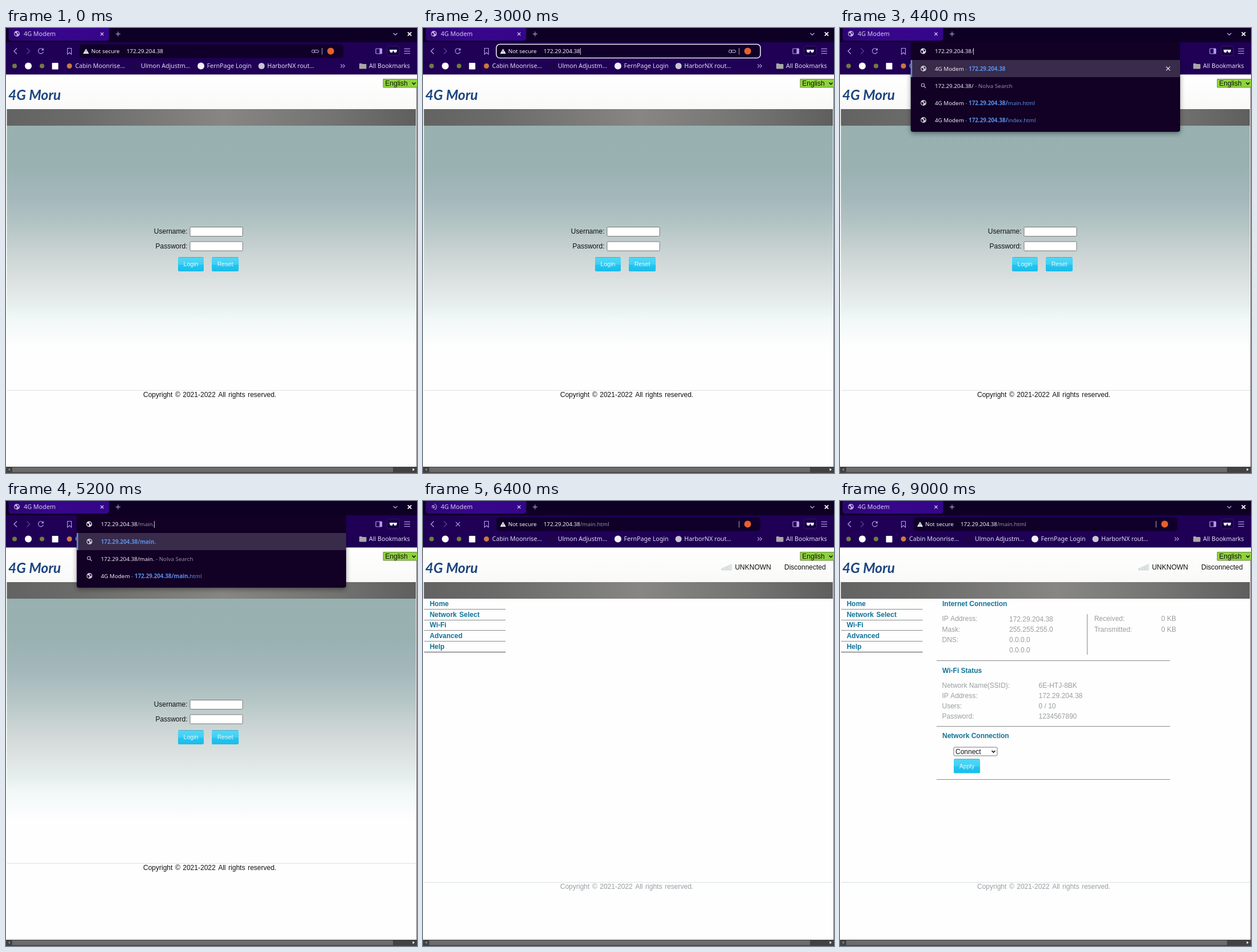
Animation of 719x779 px, one loop 9.2 s. Source, as an HTML page with a canvas:

```html
<!DOCTYPE html>
<html lang="en">
<head>
<meta charset="utf-8">
<title>Modem login</title>
<style>
html, body { margin: 0; width: 100%; height: 100%; overflow: hidden; background: #fefefe; }
canvas { display: block; }
</style>
</head>
<body>
<canvas id="stage" width="719" height="779"></canvas>
<script>
const ctx = document.getElementById('stage').getContext('2d');
const LOOP = 9200, STEP = 200;
const UI = '"Noto Sans", sans-serif';
const PAGE = '"Liberation Sans", Arial, sans-serif';
const HOST = '172.29.204.38', PATH = '/main.html';
const LILAC = '#b59be6', PALE = '#e4daf4', BLUE = '#5a8fe8', DIM = '#968ca3';
const PANEL = '#120025', PICKED = '#392b4a';

// Time at which the path has grown to each length
const KEYS = [[3800, 1], [4600, 2], [4800, 3], [5000, 5], [5200, 6], [5400, 7], [5600, 8], [5800, 10]];
const FOCUS = 2800, OPEN = 3800, ENTER = 6200, ARRIVE = 6400, DONE = 6800;

function text(s, x, y, color, size = 12, family = PAGE, style = '') {
  ctx.font = `${style} ${size}px ${family}`;
  ctx.fillStyle = color;
  ctx.fillText(s, x, y);
  return x + ctx.measureText(s).width;
}
const ui = (s, x, y, color, size = 9.8, style = '') => text(s, x, y, color, size, UI, style);

function rect(x, y, w, h, fill) {
  ctx.fillStyle = fill;
  ctx.fillRect(x, y, w, h);
}

function box(x, y, w, h, r, fill, stroke, width = 1) {
  ctx.beginPath();
  ctx.roundRect(x, y, w, h, r);
  if (fill) { ctx.fillStyle = fill; ctx.fill(); }
  if (stroke) { ctx.strokeStyle = stroke; ctx.lineWidth = width; ctx.stroke(); }
}

function dot(x, y, r, fill) {
  ctx.beginPath();
  ctx.arc(x, y, r, 0, 7);
  ctx.fillStyle = fill;
  ctx.fill();
}

function arc(x, y, r, from, to, color, width) {
  ctx.beginPath();
  ctx.arc(x, y, r, from, to);
  ctx.strokeStyle = color;
  ctx.lineWidth = width;
  ctx.stroke();
}

function path(points, color, width = 1.2, fill) {
  ctx.beginPath();
  points.forEach(([x, y], i) => i ? ctx.lineTo(x, y) : ctx.moveTo(x, y));
  if (fill) { ctx.closePath(); ctx.fillStyle = fill; ctx.fill(); }
  if (color) { ctx.strokeStyle = color; ctx.lineWidth = width; ctx.stroke(); }
}

function ramp(x0, y0, x1, y1, stops) {
  const g = ctx.createLinearGradient(x0, y0, x1, y1);
  stops.forEach(([at, c]) => g.addColorStop(at, c));
  return g;
}

function cross(x, y, r, color, width) {
  path([[x - r, y - r], [x + r, y + r]], color, width);
  path([[x + r, y - r], [x - r, y + r]], color, width);
}

function globe(x, y, r, color, land) {
  dot(x, y, r, color);
  path([[x - r * .8, y - r * .3], [x - r * .1, y - r * .1], [x, y + r * .3], [x - r * .3, y + r * .8], [x - r * .7, y + r * .3]], 0, 0, land);
  path([[x, y - r * .8], [x + r * .7, y - r * .4], [x + r * .6, y + r * .3], [x + r * .2, y - r * .2]], 0, 0, land);
}

function arrow(x, y, color) {
  path([[x - 3, y - 1.5], [x, y + 1.5], [x + 3, y - 1.5]], color, 1.6);
}

function tabs(t) {
  rect(0, 0, 719, 26, '#0e0025');
  box(4.5, -8, 176, 30.3, 5, ramp(5, 0, 180, 0, [[0, '#2b0570'], [.4, '#37068b'], [1, '#35058a']]));
  if (t < ENTER || t >= DONE) globe(19, 10, 5, '#c3b5dc', '#37068b');
  else if (t >= ARRIVE) {
    const a = (t - ARRIVE) / 160 - 1.4;
    arc(19, 10, 4.8, a, a + 2.8, '#a996cc', 1.2);
    globe(18, 10, 2.7, '#b9aad4', '#37068b');
  }
  ui('4G Modem', 31, 14, '#d8ccef', 10.75);
  cross(168, 10.5, 2.6, '#dcd0f2', 1.3);
  path([[192, 10.5], [200, 10.5]], LILAC);
  path([[196, 6.5], [196, 14.5]], LILAC);
  path([[677.5, 9], [681, 12.3], [684.5, 9]], LILAC, 1.4);
  cross(706, 10.5, 3.2, '#fff', 1.8);
}

function toolbar(t) {
  rect(0, 25, 719, 56.4, '#1f0055');
  path([[19, 35.5], [14, 40.5], [19, 45.5]], LILAC, 1.3);
  path([[36.5, 35.5], [41.5, 40.5], [36.5, 45.5]], '#5b4290', 1.3);
  if (t >= ENTER && t < DONE) cross(61, 40.5, 3.6, LILAC, 1.3);
  else {
    arc(61, 40.3, 4.5, .3, 5.5, LILAC, 1.2);
    path([[65.8, 35], [65.8, 39.3], [61.8, 39.3]], 0, 0, LILAC);
  }
  path([[107.5, 35.5], [114.5, 35.5], [114.5, 46], [111, 43], [107.5, 46], [107.5, 35]], LILAC, 1.1);

  const focus = t >= FOCUS && t < OPEN;
  box(128.3, 28.5, 462, 24, 6, '#100029', focus && '#eee8f8', 1.6);
  path([[140, 36.3], [145, 45], [135, 45]], 0, 0, '#fff');
  rect(139.5, 39.5, 1, 2.6, '#100029');
  rect(139.5, 43, 1, 1, '#100029');
  ui('Not secure', 149, 44, '#f4effb');
  const end = ui(HOST, 211, 44, '#f4effb');
  if (t >= ARRIVE) ui(PATH, end, 44, DIM);
  if (focus && t < 3400) rect(275, 35, 1, 12, '#c9c0d6');
  if (t < ENTER) {
    box(539.5, 38.7, 7.5, 4.2, 2, 0, '#c9b9e6');
    arc(537.5, 40.8, 2.6, 0, 7, '#c9b9e6', 1);
  }
  rightOfUrl();

  box(647, 36, 10.5, 9, 1, 0, LILAC, 1.2);
  rect(653.5, 36, 4, 9, LILAC);
  box(666.5, 31.5, 22, 17, 4, '#170046', '#341a68');
  rect(671, 38, 13, 1.6, '#fff');
  box(671.5, 38, 5.2, 5, [0, 0, 2.5, 2.5], '#fff');
  box(678.3, 38, 5.2, 5, [0, 0, 2.5, 2.5], '#fff');
  for (const y of [36.5, 40.5, 44.5]) path([[696.5, y], [707, y]], LILAC, 1.2);
}

function rightOfUrl() {
  rect(552.5, 35, 1, 11.5, '#b8adc9');
  dot(568, 40.5, 6, '#e5602f');
}

function bookmarks() {
  dot(15, 66.5, 4, '#6f7d3c');
  dot(39, 66.5, 6, '#fff');
  dot(63, 66.5, 4, '#6f7d3c');
  box(80.5, 61, 11, 11.5, 1, '#fff');
  dot(111, 66.5, 4.5, '#c9793d');
  dot(225, 66.5, 5, '#190940');
  dot(341, 66.5, 6, '#f3f0f8');
  dot(447, 66.5, 5.5, '#c9c4d2');
  const names = [['Cabin Moonrise…', 121], ['Ulmon Adjustm…', 236], ['FernPage Login', 351.5], ['HarborNX rout…', 457]];
  names.forEach(([s, x]) => ui(s, x, 70, PALE, 10.65));
  for (const x of [585.5, 589.5]) path([[x, 63.5], [x + 3, 66.5], [x, 69.5]], LILAC, 1.1);
  rect(605.5, 60, 1, 13, '#12003a');
  box(618, 62, 5, 4, 1, '#a7a7a7');
  box(618, 63, 12.5, 8.5, 1, '#a7a7a7');
  ui('All Bookmarks', 635, 70, PALE, 10.65);
}

function dropdown(t) {
  const typed = KEYS.reduce((n, [at, len]) => t >= at ? len : n, 0);
  const part = PATH.slice(0, typed), full = typed === PATH.length;
  const leaving = t >= ENTER;
  const url = HOST + part;
  // Each row: title, bold match, plain rest; 0 is the search row
  const page = (match, rest) => ['4G Modem', match, rest];
  const rows = typed === 1 ? [page(HOST, ''), 0, page(url, 'main.html'), page(url, 'index.html')]
    : full ? [page(url, ''), 0]
    : [['', url, ''], 0, page(url, PATH.slice(typed))];
  const bottom = 61.7 + 30 * rows.length;

  ctx.save();
  if (leaving) ctx.globalAlpha = .8;
  ctx.save();
  ctx.beginPath();
  ctx.rect(105, 56, 510, 200);
  ctx.clip();
  ctx.shadowColor = 'rgba(0,0,0,.4)';
  ctx.shadowBlur = 8;
  ctx.shadowOffsetY = 3;
  // One fill holds both the picked row and the panel, so fading stays even
  const cut = 30 / (bottom - 56);
  const fill = ramp(0, 56, 0, bottom, [[0, PICKED], [cut, PICKED], [cut, PANEL], [1, PANEL]]);
  box(123.7, 25, 471.3, bottom - 25, [0, 0, 4, 4], fill);
  ctx.restore();
  rect(123.7, 56, 2.5, 30, BLUE);
  rows.forEach((row, i) => {
    const y = 71 + 30 * i, bg = i ? PANEL : PICKED;
    if (!row) {
      arc(145, y - 1, 2.7, 0, 7, '#bdb3c9', 1.1);
      path([[147, y + 1], [150, y + 4]], '#bdb3c9', 1.3);
      ui(' - Nolva Search', ui(url, 166, y + 4, '#eee8f5'), y + 4, DIM);
      return;
    }
    globe(146, y, 5, '#d2cadb', bg);
    let x = 166;
    if (row[0]) x = ui(' - ', ui(row[0], x, y + 4, '#eee8f5'), y + 4, DIM);
    x = ui(row[1], x, y + 4, BLUE, 9.8, '600');
    ui(row[2], x, y + 4, BLUE);
    if (!i && row[0]) cross(574, y, 3.4, '#eee8f5', 1.3);
  });
  ctx.restore();

  rect(123.7, 25, 471.3, 31, PANEL);
  if (leaving) {
    dot(140, 40.5, 5, '#fff');
    rect(139.4, 40, 1.2, 3.5, PANEL);
    rect(139.4, 37.5, 1.2, 1.3, PANEL);
    ui(PATH, ui(HOST, 156, 44, '#f4effb'), 44, DIM);
    rightOfUrl();
  } else {
    globe(145.5, 40.5, 5, '#e6e0ee', PANEL);
    const end = ui(part, ui(HOST, 166, 44, '#f4effb'), 44, DIM);
    rect(Math.round(end - .8), 35, 1, 12, '#c9c0d6');
  }
}

function button(label, x, y, w, h) {
  box(x, y, w, h, 2, ramp(0, y, 0, y + h, [[0, '#50d8f5'], [.5, '#40d0f4'], [.56, '#24c4ef'], [1, '#19bdea']]));
  rect(x + 1, y, w - 2, 1, '#5ba6bd');
  ctx.textAlign = 'center';
  text(label, x + w / 2, y + 16, '#e4faff', 10.6);
  ctx.textAlign = 'left';
}

function footer(y, color) {
  rect(2, y, 715, 1, '#d9e0e3');
  ctx.wordSpacing = '1.2px';
  text('Copyright © 2021-2022 All rights reserved.', 240, y + 12, color);
  ctx.wordSpacing = '0px';
}

function pageFrame() {
  rect(0, 81, 719, 698, '#fefefe');
  rect(0, 81, 719, 61, ramp(0, 81, 0, 142, [[0, '#fff'], [1, '#f9f9f8']]));
  text('4G Moru', 4, 126, '#1c457f', 24.5, 'Lato, sans-serif', 'italic bold');
  rect(1.5, 142, 715.5, 29, ramp(2, 0, 717, 0, [[0, '#636363'], [.18, '#6b6b6a'], [.53, '#878684'], [.8, '#737372'], [1, '#5e5f5e']]));
  box(660, 89.5, 62, 14.5, 0, '#8ed33b', '#6c8746');
  text('English', 663.3, 101, '#101010');
  arrow(713.5, 97, '#111');
}

function login() {
  const stops = [[0, '#98b0b0'], [.18, '#99b1b1'], [.33, '#a4b8bb'], [.46, '#b6c6c6'], [.59, '#cdd6d5'],
    [.72, '#dfe3e3'], [.8, '#e6eeed'], [.87, '#f1f8f7'], [1, '#fefefe']];
  rect(1.5, 171, 715.5, 389, ramp(0, 171, 0, 560, stops));
  ctx.textAlign = 'right';
  text('Username:', 317.5, 360, '#111');
  text('Password:', 317.5, 386, '#111');
  ctx.textAlign = 'left';
  for (const y of [348.5, 374]) box(322, y, 92, 16, 1.5, '#fff', '#767676');
  button('Login', 301, 401, 45, 25);
  button('Reset', 360, 401, 47, 25);
  footer(634, '#111');
}

function home(t) {
  const teal = '#0f7397', gray = '#9a9d9f', line = '#8b8b8b';
  const list = (x, y, gap, items) => items.forEach((s, i) => text(s, x, y + gap * i, gray));
  const head = (s, x, y) => text(s, x, y, teal, 12, PAGE, 'bold');
  for (let i = 0; i < 5; i++) box(522.5 + i * 3.7, 118 - i * 1.7, 2.4, 3 + i * 1.7, 0, '#eef1f1', '#bfc8c8', .8);
  text('UNKNOWN', 545.7, 120, '#111');
  text('Disconnected', 632, 120, '#111');
  ctx.wordSpacing = '1.2px';
  ['Home', 'Network Select', 'Wi-Fi', 'Advanced', 'Help'].forEach((s, i) => {
    const y = 184 + 18.7 * i;
    head(s, 11.7, Math.round(y));
    rect(2, Math.round(y + 5), 142.5, 1, i < 4 ? line : '#4d4d4d');
  });
  ctx.wordSpacing = '0px';
  footer(667, gray);
  if (t < 6600) return;

  head('Internet Connection', 179, 184);
  list(178.5, 210.3, 18.3, ['IP Address:', 'Mask:', 'DNS:']);
  list(296, 211, 18, [HOST, '255.255.255.0', '0.0.0.0', '0.0.0.0']);
  list(444.7, 210.3, 18.5, ['Received:', 'Transmitted:']);
  list(562, 210.3, 18.5, ['0 KB', '0 KB']);
  rect(432, 198, 1, 71, line);
  head('Wi-Fi Status', 179, 301);
  list(178.5, 327, 18, ['Network Name(SSID):', 'IP Address:', 'Users:', 'Password:']);
  list(347.5, 327, 18, ['6E-HTJ-8BK', HOST, '0 / 10', '1234567890']);
  head('Network Connection', 179, 415);
  for (const y of [279, 394, 487]) rect(169, y, 408.5, 1, line);
  box(199, 431, 76, 15, 2, '#fff', '#767676');
  text('Connect', 202, 443, '#111');
  arrow(268.5, 438.5, '#111');
  button('Apply', 199, 451.5, 46, 25);
}

function scrollbar() {
  rect(718, 104, 1, 664, '#6a6a6a');
  rect(0, 768, 719, 11, '#424242');
  rect(11, 769, 666, 8.5, '#6c6b6b');
  path([[7, 770.5], [7, 775.5], [3.5, 773]], 0, 0, '#858585');
  path([[711.5, 770.5], [711.5, 775.5], [715, 773]], 0, 0, '#fff');
}

function draw(now) {
  const t = Math.floor(now % LOOP / STEP) * STEP;
  ctx.clearRect(0, 0, 719, 779);
  pageFrame();
  if (t < ARRIVE) login();
  else home(t);
  scrollbar();
  tabs(t);
  toolbar(t);
  bookmarks();
  if (t >= OPEN && t < ARRIVE) dropdown(t);
}

const start = performance.now();
function tick() {
  draw(performance.now() - start);
  requestAnimationFrame(tick);
}
tick();
</script>
</body>
</html>
```
